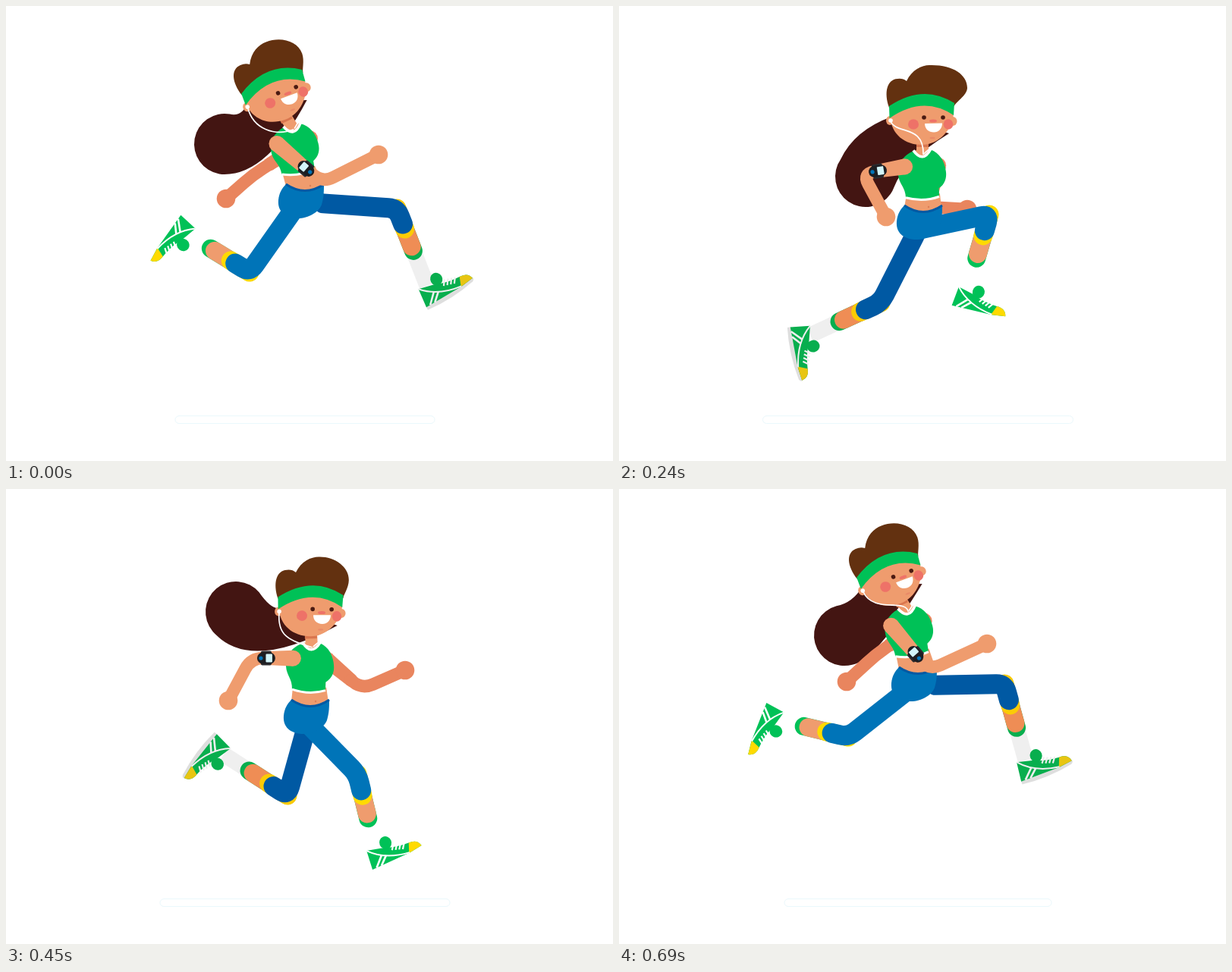
An HTML page with a canvas for the animation above (0.72 s loop, 800 by 600 pixels).

```html
<!DOCTYPE html>
<html lang="en">
<head>
<meta charset="utf-8">
<title>Runner</title>
<style>
  html, body { margin: 0; width: 100%; height: 100%; overflow: hidden; background: #fff; }
  canvas { display: block; }
</style>
</head>
<body>
<canvas id="stage" width="800" height="600"></canvas>
<script>
const ctx = document.getElementById('stage').getContext('2d');
const LOOP = 720, STEP = 30, RAD = Math.PI / 180;

const C = {
  hair: '#633110', tail: '#431512', skin: '#ef9c6e', farSkin: '#e9855e',
  green: '#00c157', blue: '#0074b8', navy: '#0059a3', blush: '#ee7268'
};
const NEAR = { pants: C.blue, skin: C.skin, cuff: '#ffda00', green: C.green,
               sock: '#fff', sole: '#fff', toe: '#ffda00' };
const FAR = { pants: C.navy, skin: '#ef8d55', cuff: '#fbcb05', green: '#08ae4e',
              sock: '#efefef', sole: '#dedede', toe: '#e8c512' };

// Eight poses. Body: head x y turn, collar x y turn, waist x y, ground half width, hair sway
const BODY = [
  [370, 120.5, -19, 378, 161, -9, 394, 238, 171, 0],
  [419, 182.5, 6, 405, 218, -3, 401, 292, 202, 1],
  [411, 156, 0, 400, 194, -2, 401, 266, 204.5, 10],
  [392, 130.5, -11, 391, 173, -4, 398, 247, 175, 1],
  [413, 167.5, 1, 403, 207, 2, 401, 281, 191, 0],
  [402, 151.5, -3, 396, 188, -4, 402, 264, 204.5, 0],
  [373, 121.5, -19, 380, 160, -8, 394, 238, 176, 0],
  [418, 181, 4, 404, 216, -2, 401, 290, 205, 6]
];
// Ponytail: ball x y, upper angle, upper bend x y, lower angle, lower bend x y
const TAIL = [
  [288, 182, 280, 312, 146, 90, 345, 222],
  [310, 173, 325, 356, 164, 130, 350, 264],
  [325, 225, 215, 310, 164, 20, 375, 205],
  [293, 164, 300, 328, 140, 90, 350, 225],
  [303, 162, 320, 350, 160, 130, 325, 240],
  [314, 236, 215, 306, 175, 20, 358, 215],
  [297, 193, 255, 308, 150, 75, 337, 228],
  [303, 203, 265, 330, 182, 75, 360, 245]
];
// Legs: knee x y, ankle x y, foot turn
const LEG_NEAR = [
  [321, 351, 241, 302, 126], [419, 418, 324, 379, 116],
  [488, 275, 459, 375, 14], [487, 278, 533, 369, -33],
  [463, 376, 487, 474, -24], [337, 385, 250, 433, 64],
  [302, 327, 211, 305, 112], [466, 366, 372, 392, 82]
];
const LEG_FAR = [
  [515, 267, 555, 369, -30], [455, 411, 427, 504, 0],
  [345, 391, 252, 434, 80], [326, 352, 257, 286, 134],
  [371, 404, 287, 350, 129], [497, 323, 402, 374, 63],
  [508, 257, 536, 358, -20], [395, 413, 342, 496, 30]
];
// Arms: elbow x y, hand x y
const ARM_NEAR = [
  [417, 233, 491, 196], [382, 304, 457, 300], [321, 221, 352, 278], [312, 195, 256, 239],
  [323, 223, 293, 279], [369, 271, 438, 286], [409, 239, 485, 204], [350, 277, 405, 312]
];
const ARM_FAR = [
  [325, 223, 290, 254], [372, 266, 370, 324], [408, 265, 459, 268], [472, 227, 535, 201],
  [469, 264, 526, 239], [385, 255, 400, 268], [338, 219, 300, 254], [385, 282, 415, 305]
];
// Earphone cord bends
const CORD = [
  [326, 163, 355, 172], [368, 205, 402, 198], [366, 170, 402, 156], [343, 170, 360, 176],
  [357, 195, 375, 200], [355, 172, 392, 148], [335, 165, 378, 144], [366, 190, 402, 184]
];

// The two half cycles mirror each other: [time, pose, sides swapped]
const SLOTS = [
  [0, 0, 0], [30, 3, 1], [90, 4, 1], [120, 1, 0], [180, 7, 0], [240, 2, 0], [330, 6, 1],
  [360, 0, 1], [390, 3, 0], [450, 4, 0], [480, 1, 1], [540, 7, 1], [600, 5, 0], [690, 6, 0]
];

// Periodic cubic through the slots
function track(own, other = own, dx = 0) {
  const n = SLOTS.length;
  const rows = SLOTS.map(([, p, swap]) =>
    swap ? other[p].map((v, i) => i % 2 ? v : v + dx) : own[p]);
  const row = i => rows[(i + n) % n];
  const gap = i => (SLOTS[(i + 1 + n) % n][0] - SLOTS[(i + n) % n][0] + LOOP) % LOOP;
  const rate = (i, k) => (row(i + 1)[k] - row(i)[k]) / gap(i);
  const slope = (i, k) => {
    const a = gap(i - 1), b = gap(i);
    return (b * rate(i - 1, k) + a * rate(i, k)) / (a + b);
  };
  return t => {
    let i = n - 1;
    while (SLOTS[i][0] > t) i--;
    const h = gap(i), u = (t - SLOTS[i][0]) / h, v = 1 - u;
    return row(i).map((a, k) =>
      a * (1 + 2 * u) * v * v + row(i + 1)[k] * u * u * (3 - 2 * u) +
      h * u * v * (slope(i, k) * v - slope(i + 1, k) * u));
  };
}

const body = track(BODY), tail = track(TAIL), cord = track(CORD);
const legNear = track(LEG_NEAR, LEG_FAR), legFar = track(LEG_FAR, LEG_NEAR);
const armNear = track(ARM_NEAR, ARM_FAR, -30), armFar = track(ARM_FAR, ARM_NEAR, 30);

const along = (a, b, d) => {
  const l = Math.hypot(b[0] - a[0], b[1] - a[1]) || 1;
  return [a[0] + (b[0] - a[0]) * d / l, a[1] + (b[1] - a[1]) * d / l];
};
const place = (x, y, deg) => (px, py) => {
  const c = Math.cos(deg * RAD), s = Math.sin(deg * RAD);
  return [x + px * c - py * s, y + px * s + py * c];
};
function within(x, y, deg, draw) {
  ctx.save();
  ctx.translate(x, y);
  ctx.rotate(deg * RAD);
  draw();
  ctx.restore();
}
function fill(d, color) {
  ctx.fillStyle = color;
  ctx.fill(new Path2D(d));
}
function stroke(d, color, width, cap = 'butt') {
  ctx.strokeStyle = color;
  ctx.lineWidth = width;
  ctx.lineCap = cap;
  ctx.lineJoin = 'round';
  ctx.stroke(new Path2D(d));
}
function oval(x, y, rx, ry, color) {
  ctx.fillStyle = color;
  ctx.beginPath();
  ctx.ellipse(x, y, rx, ry, 0, 0, 7);
  ctx.fill();
}
function box(x, y, w, h, r, color) {
  ctx.fillStyle = color;
  ctx.beginPath();
  ctx.roundRect(x, y, w, h, r);
  ctx.fill();
}
const line = (a, b, color, width, cap) => stroke(`M${a}L${b}`, color, width, cap);
const limb = (a, b, c, bend, color, width) =>
  stroke(`M${a}L${along(b, a, bend)}Q${b} ${along(b, c, bend)}L${c}`, color, width, 'round');

function taper(a, b, ra, rb, color) {
  const g = Math.atan2(b[1] - a[1], b[0] - a[0]) + Math.PI / 2;
  const at = (p, r) => [p[0] + Math.cos(g) * r, p[1] + Math.sin(g) * r];
  fill(`M${at(a, ra)}L${at(b, rb)}L${at(b, -rb)}L${at(a, -ra)}Z`, color);
  oval(...a, ra, ra, color);
  oval(...b, rb, rb, color);
}

function shoe(x, y, turn, c) {
  within(x, y, turn, () => {
    fill('M-15 23L57 20Q59 23 55 25Q20 32-15 28Z', c.sole);
    fill('M-12-2L8 3C20 8 30 10 43 11Q55 11 57 21L39 23.5L-15 24Z', c.green);
    oval(15, -1.5, 8, 8.5, c.green);
    fill('M43 11Q55 11 57 21L38 23.5Z', c.toe);
    stroke('M-12-2Q6 19 39 23', c.sock, 2);
    stroke('M-9 24L4 11M-2 24L9 14', c.sock, 2.6);
    let laces = '';
    for (let i = 0; i < 4; i++) laces += `M${19 + i * 4.5} ${11 + i * 1.5}l5-7`;
    stroke(laces, c.sock, 2.2);
  });
}

function leg([kx, ky, ax, ay, turn], hip, c) {
  const k = [kx, ky], a = [ax, ay], down = d => along(k, a, d);
  line(k, a, c.sock, 21);
  shoe(ax, ay, turn, c);
  line(k, down(60), c.green, 24, 'round');
  line(k, down(54), c.skin, 24, 'round');
  line(k, down(29), c.cuff, 25, 'round');
  limb(hip, k, down(22), 11, c.pants, 26);
}

function arm([ex, ey, hx, hy], s, color) {
  const e = [ex, ey], h = [hx, hy];
  limb(s, e, h, 16, color, 16.5);
  taper(s, [s[0] + (ex - s[0]) * .7, s[1] + (ey - s[1]) * .7], 10.5, 8.7, color);
  oval(hx, hy, 12.3, 12.3, color);
}

function player([ex, ey], [sx, sy]) {
  const turn = Math.atan2(ey - sy, ex - sx) / RAD - 90;
  within(sx + (ex - sx) * .64, sy + (ey - sy) * .64, turn, () => {
    box(-9.5, -7, 19, 14, 2, '#2b2b2f');
    box(-7.5, -12, 15, 24, 7.5, '#1d1e22');
    box(-5.5, -8, 11, 8.5, 1, '#d3f5fa');
    oval(0, 7, 2.6, 2.6, C.blue);
  });
}

function ponytail([x, y, a1, nx, ny, a2, bx, by], head) {
  const end = head(24, 12);
  ctx.fillStyle = C.tail;
  ctx.beginPath();
  ctx.moveTo(...head(-52, -10));
  ctx.quadraticCurveTo(nx, ny, x + 40 * Math.cos(a1 * RAD), y + 40 * Math.sin(a1 * RAD));
  ctx.arc(x, y, 40, a1 * RAD, a2 * RAD, true);
  ctx.quadraticCurveTo(bx, by, ...end);
  ctx.fill();
}

function face(sway, open) {
  const r = 38 + sway;
  oval(29, -4, 5.5, 6, C.skin);
  oval(-54, -5, 5, 6, C.skin);
  fill(`M-55-22C-62-42-58-59-44-60Q-37-61-32-57C-25-72-12-78-2-78` +
       `C${18 + sway}-79 ${r}-66 ${r}-48C${r}-38 31-28 31-24Z`, C.hair);
  fill('M-54-11C-52 14-34 27-12 27C10 27 28 8 30-14Q-10-39-54-11Z', C.skin);
  fill('M-55-24Q-10-54 31-28L30-12Q-10-39-54.5-8Z', C.green);
  for (const x of [-23, 23]) oval(x, 0, x < 0 ? 7 : 6.3, 6.8, C.blush);
  for (const x of [-9, 16]) oval(x, -9, 2.8, 2.8 * open, '#4a1a12');
  oval(3, -4.5, 5, 2, C.blush);
  fill('M-8-1L15-1.5C15 6 10 10.5 4 10.5C-3 10.5-8 6-8-1Z', '#fff');
  oval(2, 18, 3.5, 1.2, '#e98a68');
  oval(-53, -5, 2.8, 2.8, '#fff');
}

function draw(t) {
  const [hx, hy, ha, cx, cy, ca, wx, wy, gw, sway] = body(t);
  const head = place(hx, hy, ha), chest = place(cx, cy, ca);
  const near = legNear(t), far = legFar(t), an = armNear(t), wire = cord(t);
  const shoulder = chest(-24, 17), neck = chest(0, 1);
  const blink = Math.min(1, .12 + Math.abs(t - 120) / 45);

  ctx.fillStyle = '#fff';
  ctx.fillRect(0, 0, 800, 600);

  ctx.strokeStyle = '#eaf8fc';
  ctx.lineWidth = 1;
  ctx.beginPath();
  ctx.roundRect(394 - gw, 540.5, gw * 2, 10, 5);
  ctx.stroke();

  ponytail(tail(t), head);
  arm(armFar(t), chest(20, 17), C.farSkin);
  leg(far, [wx + (far[0] - wx) * .2, wy + 18 + (far[1] - wy) * .15], FAR);
  leg(near, [wx - 8 + (near[0] - wx) * .07, wy + 28], NEAR);

  fill(`M${chest(-23, 54)}L${chest(21, 54)}L${wx + 24} ${wy}L${wx} ${wy + 9}L${wx - 25} ${wy}Z`, C.skin);
  oval(wx + 7, wy - 1, 1.2, 1.2, '#dd7d55');
  within(wx, wy, 0, () => {
    fill('M-25-3Q0 14 25-3C25 6 25 14 22 24C18 34 4 43-12 42C-30 40-36 30-35 18C-34 8-30 2-25-3Z', C.blue);
    stroke('M-25-3Q0 14 25-3', C.navy, 3);
  });

  within(cx, cy, ca, () => {
    fill('M-12-3C-26 2-34 14-33 28C-32 40-24 44-24 58Q-1 65 20 58L20 47' +
         'C28 42 31 34 30 25C29 12 22 0 11-4Q0 12-12-3Z', C.green);
    stroke('M-24 58Q-1 65 20 58', '#fff', 3);
    fill('M-11-4Q0 14 11-5Z', C.skin);
  });
  line(head(-11, 18), neck, C.skin, 16);
  line(head(-11, 18), along(head(-11, 26), neck, 4), '#d9764f', 16);
  within(cx, cy, ca, () => stroke('M-12-4Q0 14 11-5', '#fff', 3.6));

  within(hx, hy, ha, () => face(sway, blink));
  stroke(`M${head(-53, -4)}C${wire} ${chest(1, 2)}`, '#fff', 1.7);
  stroke(`M${chest(2, 1)}Q${chest(8, -6)} ${head(25, 17)}`, '#fff', 1.7);

  arm(an, shoulder, C.skin);
  player(an, shoulder);
}

const start = performance.now();
function tick() {
  const t = (performance.now() - start) % LOOP;
  draw(t < 2 * STEP ? 0 : Math.floor(t / STEP) * STEP);
  requestAnimationFrame(tick);
}
tick();
</script>
</body>
</html>
```
